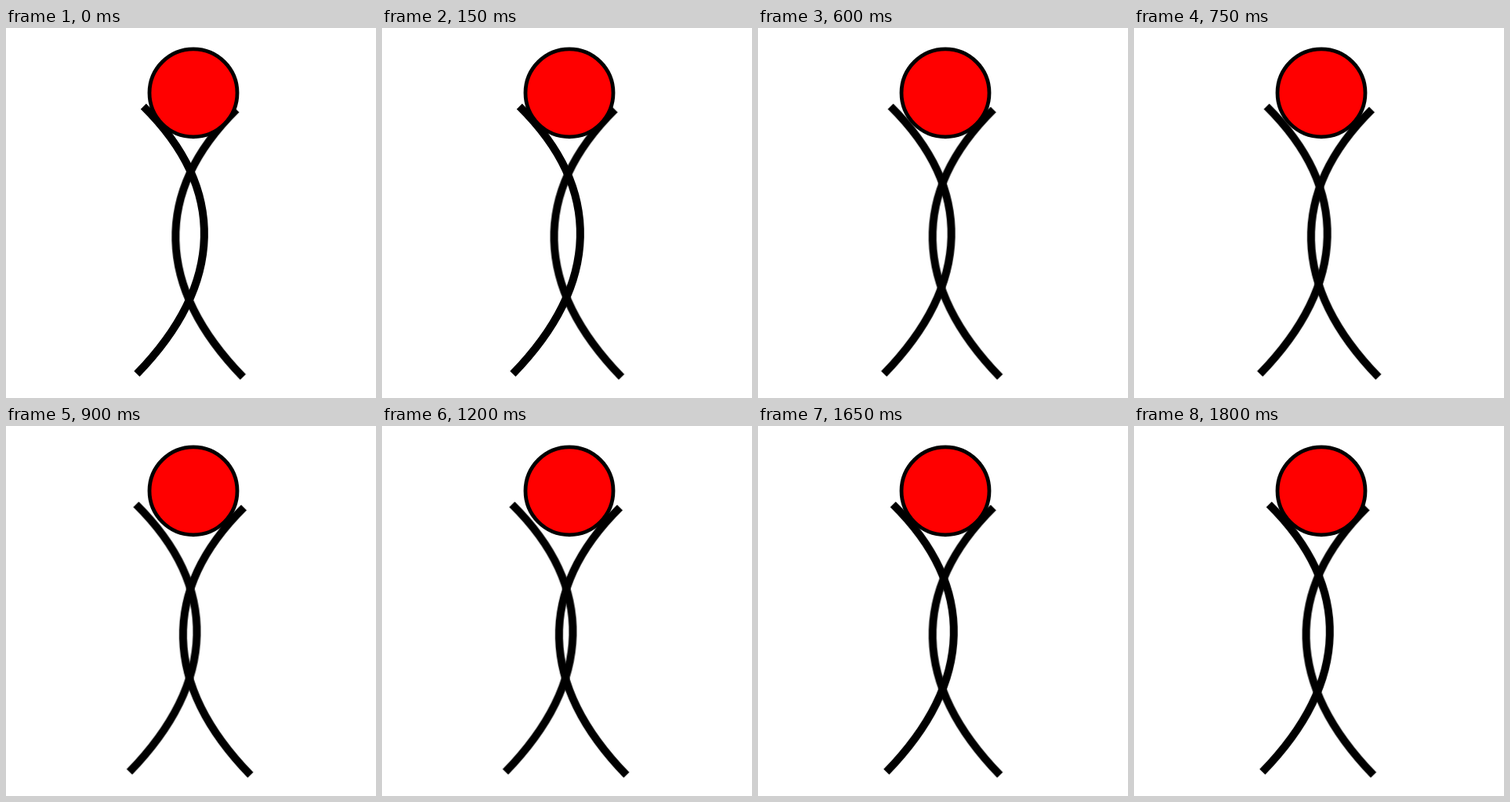
An HTML page without scripts for the animation above (1.95 s loop, 472x472 px).

```html
<!DOCTYPE html>
<html lang="en">
<head>
<meta charset="utf-8">
<title>Swaying figure</title>
<style>
  html, body { margin: 0; width: 100%; height: 100%; overflow: hidden; background: #fff; }
  svg { display: block; width: 100vw; height: 100vh; }
  .limb { fill: none; stroke: #000; stroke-width: 10; }
  .head { fill: #f00; stroke: #000; stroke-width: 4.8; }
  .left, .right { --step: 3.15px; animation: 1950ms step-end infinite; }
  .left { animation-name: sway-left; }
  .right { animation-name: sway-right; }

  /* 13 beats of 150 ms; the two limbs step outwards in turn, then back */
  @keyframes sway-left {
    0% { transform: translateX(0); }
    15.3846% { transform: translateX(calc(-1 * var(--step))); }
    30.7692% { transform: translateX(calc(-2 * var(--step))); }
    46.1538% { transform: translateX(calc(-3 * var(--step))); }
    69.2308% { transform: translateX(calc(-2 * var(--step))); }
    84.6154%, 100% { transform: translateX(calc(-1 * var(--step))); }
  }
  @keyframes sway-right {
    0% { transform: translateX(0); }
    7.6923% { transform: translateX(var(--step)); }
    23.0769% { transform: translateX(calc(2 * var(--step))); }
    38.4615% { transform: translateX(calc(3 * var(--step))); }
    53.8462% { transform: translateX(calc(4 * var(--step))); }
    61.5385% { transform: translateX(calc(3 * var(--step))); }
    76.9231% { transform: translateX(calc(2 * var(--step))); }
    92.3077%, 100% { transform: translateX(var(--step)); }
  }
</style>
</head>
<body>
<svg viewBox="0 0 472 472">
  <defs>
    <path id="limb" class="limb" d="M175.3 100C281.5 205 278.7 326 166.9 441.2"/>
  </defs>
  <g class="left"><use href="#limb"/></g>
  <g class="right"><use href="#limb" transform="translate(469.3 4) scale(-1 1)"/></g>
  <circle class="head" cx="239" cy="82.8" r="56"/>
</svg>
</body>
</html>
```
